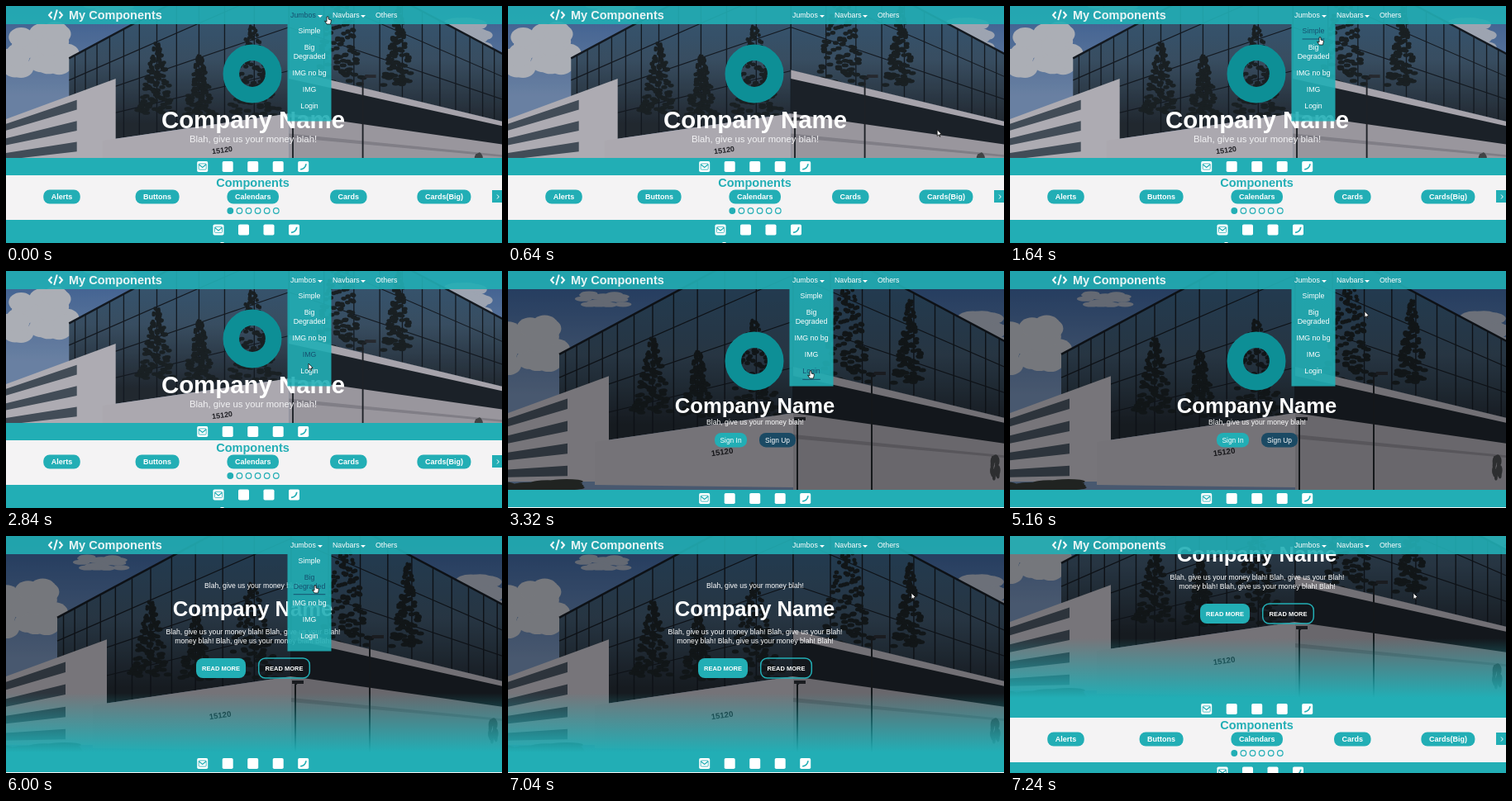
Animation, 600 px wide and 287 px high, one loop 7.28 s. Source, as an HTML page with a canvas:

```html
<!DOCTYPE html>
<html lang="en">
<head>
<meta charset="utf-8">
<title>My Components</title>
<style>
html, body { margin: 0; width: 100%; height: 100%; overflow: hidden; background: #22aeb5; }
canvas { display: block; }
</style>
</head>
<body>
<canvas id="stage" width="600" height="287"></canvas>
<script>
const c = document.getElementById('stage').getContext('2d');
const LOOP = 7280, STEP = 40, MOVE = 640;
const TEAL = '#22aeb5', GLASS = 'rgba(34,174,181,.9)', NAVY = '#15506f', WHITE = '#fff';
const SLOGAN = 'Blah, give us your money blah!';

// Pointer stops: arrival time, x, y
const STOPS = [
  [0, 389, 13], [720, 525, 156], [1640, 375, 38], [2080, 336, 125], [2440, 470, 156],
  [2840, 366, 112], [3240, 366, 121], [4080, 381, 9], [4240, 407, 14], [4680, 379, 13],
  [5560, 537, 126], [5720, 374, 60], [6640, 537, 160], [7000, 488, 69]
];

// Each item sits below the one before it
let nextY = 30;
const MENU = ['Simple', 'Big/Degraded', 'IMG no bg', 'IMG', 'Login'].map(label => {
  const lines = label.split('/'), y = nextY, last = y + (lines.length - 1) * 10.5;
  nextY = last + 20.2;
  return { lines, y, end: last + 11.5 };
});

function font(size, bold) {
  c.font = (bold ? 'bold ' : '') + size + 'px "Liberation Sans", Arial, sans-serif';
}

function text(s, x, y, size, color = WHITE, bold = false, align = 'center') {
  font(size, bold);
  c.textAlign = align;
  c.fillStyle = color;
  c.fillText(s, x, y + size * 0.36);
}

function rect(x, y, w, h, color) {
  c.fillStyle = color;
  c.fillRect(x, y, w, h);
}

function pill(x, y, w, h, r, color, line) {
  c.beginPath();
  c.roundRect(x, y, w, h, r);
  c.fillStyle = c.strokeStyle = color;
  c.lineWidth = line;
  if (line) c.stroke();
  else c.fill();
}

function trace(points) {
  c.beginPath();
  for (let i = 0; i < points.length; i += 2) c.lineTo(points[i], points[i + 1]);
}

function poly(color, ...points) {
  trace(points);
  c.fillStyle = color;
  c.fill();
}

function stroke(color, width, ...points) {
  trace(points);
  c.strokeStyle = color;
  c.lineWidth = width;
  c.stroke();
}

function blob(x, y, rx, ry, color) {
  c.beginPath();
  c.ellipse(x, y, rx, ry, 0, 0, 7);
  c.fillStyle = color;
  c.fill();
}

function fade(y0, y1, ...colors) {
  const g = c.createLinearGradient(0, y0, 0, y1);
  colors.forEach((s, i) => g.addColorStop(i / (colors.length - 1), s));
  return g;
}

function randomizer(seed) {
  return () => (seed = seed * 16807 % 2147483647) / 2147483647;
}

function cloud(x, y, w, h, color) {
  const rnd = randomizer(Math.round(x * 31 + y + 2000));
  for (let i = 0; i < 22; i++)
    blob(x + (rnd() - 0.5) * w, y + (rnd() - 0.5) * h, w * 0.2, h * 0.22, color);
}

function tree(x, top, w, h) {
  const rnd = randomizer(x * 97);
  for (let k = 0; k < 1; k += 0.008)
    blob(x + (rnd() - 0.5) * w * (0.15 + k), top + k * h, 2 + k * 3, 2.5, '#1d2428');
}

// Two-point perspective: both faces meet at the corner, lines run to the horizon
const CORNER = 345, HORIZON = 255, LEFT = -225, RIGHT = 920;
const along = (vx, x, y) => y + (HORIZON - y) * (x - CORNER) / (vx - CORNER);

function band(color, vx, x0, x1, top, bottom) {
  poly(color, x0, along(vx, x0, top), x1, along(vx, x1, top),
    x1, along(vx, x1, bottom), x0, along(vx, x0, bottom));
}

function windowFace(vx, end, bottom) {
  const roof = -51;
  band(fade(20, 185, '#3a6285', '#40586e', '#252d36'), vx, CORNER, end, roof, bottom);
  for (let y = roof; y < bottom; y += 56)
    stroke('#161c24', y === roof ? 2.5 : 1.2, CORNER, y, end, along(vx, end, y));
  for (let i = 0; i < 12; i++) {
    const x = vx + (CORNER - vx) / (1 + i * 0.085);
    stroke('#161c24', 1.4, x, along(vx, x, roof), x, along(vx, x, bottom));
  }
}

function lamp(x, y, arm) {
  stroke('#22262c', 2, x, 270, x, y + 4, x + 4, y, x + arm, y);
  rect(x + arm - 4, y - 1, 14, 4, '#2b2f35');
}

// Office building, simplified to flat areas
function building() {
  rect(-40, -10, 680, 300, fade(0, 150, '#355f9c', '#7892b8'));
  cloud(20, 92, 80, 56, '#c3c6ce');
  cloud(115, 34, 52, 14, '#a6afbf');
  cloud(555, 72, 90, 34, '#b3bbc9');

  windowFace(LEFT, 62, 172);
  windowFace(RIGHT, 640, 116);
  tree(175, 82, 44, 90);
  tree(230, 98, 36, 78);
  tree(298, 60, 62, 115);
  tree(410, 10, 62, 125);
  tree(486, 36, 34, 100);

  // Low white wing
  band('#c5c3ca', LEFT, 122, -40, 45, 255);
  for (let y = 62; y < 230; y += 52) band('#4b5663', LEFT, 72, -40, y, y + 24);

  // Ledge, dark ribbon of windows, white walls
  band('#1f262e', RIGHT, CORNER, 640, 116, 174);
  band('#bdbac2', RIGHT, CORNER, 640, 116, 127);
  band('#c2bfc7', LEFT, CORNER, 105, 172, 262);
  band('#aeabb3', RIGHT, CORNER, 640, 172, 290);
  band('#928f98', RIGHT, CORNER, 640, 198, 203);
  cloud(28, 262, 100, 14, '#363b37');
  cloud(590, 238, 10, 22, '#4b4d50');

  lamp(440, 123, 7);
  lamp(350, 178, 0);
  c.save();
  c.translate(259, 219);
  c.rotate(-0.14);
  text('15120', 0, 0, 9.6, '#24242a', true);
  c.restore();
}

function photo(height, y, scale, shade) {
  c.save();
  c.beginPath();
  c.rect(0, 0, 600, height);
  c.clip();
  c.translate(300 - 300 * scale, y);
  c.scale(scale, scale);
  building();
  c.restore();
  rect(0, 0, 600, height, `rgba(0,0,0,${shade})`);
}

function icon(kind, x, y) {
  pill(x - 6.5, y - 6.5, 13, 13, 1.8, WHITE);
  if (kind === 'mail') {
    stroke(TEAL, 1.3, x - 4.5, y - 2.7, x, y + 1, x + 4.5, y - 2.7);
    pill(x - 4.5, y - 3.6, 9, 7.2, 1, TEAL, 0.8);
  } else if (kind === 'phone') {
    c.beginPath();
    c.arc(x - 4, y - 4, 7.3, 0.1, 1.5);
    c.strokeStyle = TEAL;
    c.lineWidth = 1.8;
    c.stroke();
  }
}

function icons(kinds, x, y) {
  kinds.forEach((kind, i) => icon(kind, x + i * 30.5, y));
}

function lowerPage(y) {
  rect(0, y, 600, 21, TEAL);
  icons(['mail', '', '', '', 'phone'], 237.7, y + 10.5);
  rect(0, y + 21, 600, 54, '#f4f3f4');
  text('Components', 298.5, y + 29.3, 14.5, TEAL, true);
  ['Alerts', 'Buttons', 'Calendars', 'Cards', 'Cards(Big)'].forEach((name, i) => {
    const x = 67.5 + i * 115.6;
    font(9, true);
    const w = c.measureText(name).width + 19;
    pill(x - w / 2, y + 38.5, w, 17, 7.5, TEAL);
    text(name, x, y + 47, 9, WHITE, true);
  });
  rect(588, y + 39, 12, 15, TEAL);
  stroke(WHITE, 1, 594, y + 44.5, 596.3, y + 47, 594, y + 49.5);
  for (let i = 0; i < 6; i++) {
    const x = 271.3 + i * 11.1;
    pill(x - 3.3, y + 60.7, 6.6, 6.6, 3.3, TEAL, 1.2);
    if (i === 0) blob(x, y + 64, 3.3, 3.3, TEAL);
  }
  rect(0, y + 75, 600, 287, TEAL);
  icons(['mail', '', '', 'phone'], 257, y + 87);
  rect(259.5, y + 102, 4, 2, WHITE);
}

function ring(y) {
  c.beginPath();
  c.arc(298, y, 25.7, 0, 7);
  c.strokeStyle = '#0d8f96';
  c.lineWidth = 19.6;
  c.stroke();
}

function button(label, x, y, w, h, size, color, line) {
  pill(x - w / 2, y - h / 2, w, h, 8, color, line);
  text(label, x, y, size, WHITE, size < 8);
}

function imagePage() {
  photo(184, -31.5, 0.94, 0.12);
  ring(82);
  text('Company Name', 299, 137, 29.4, WHITE, true);
  text(SLOGAN, 299, 161, 11.27, '#f1f1f3');
  lowerPage(184);
}

function loginPage() {
  photo(265, 0, 1, 0.4);
  ring(109);
  text('Company Name', 298.5, 162.5, 25.6, WHITE, true);
  text(SLOGAN, 299, 183, 8.65);
  button('Sign In', 269.5, 204.7, 39, 17.5, 8.4, TEAL);
  button('Sign Up', 326, 204.7, 44, 17.5, 8.4, '#1b4a64');
  lowerPage(265);
}

function degradedPage(scroll) {
  c.save();
  c.translate(0, -scroll);
  photo(265, -2, 1, 0.4);
  rect(0, 190, 600, 75, fade(190, 262, 'rgba(34,174,181,0)', TEAL));
  text(SLOGAN, 299, 60, 8.65);
  text('Company Name', 298.5, 88, 25.6, WHITE, true);
  text('Blah, give us your money blah! Blah, give us your Blah!', 299, 116, 8.65);
  text('money blah! Blah, give us your money blah! Blah!', 299, 126.7, 8.65);
  button('READ MORE', 260, 160, 60, 24, 7.5, TEAL);
  button('READ MORE', 336.5, 160, 61.6, 24, 7.5, TEAL, 1.5);
  lowerPage(265);
  c.restore();
}

function caret(x) {
  poly(WHITE, x, 11, x + 6, 11, x + 3, 14);
}

function navbar(onJumbos, ruled) {
  rect(0, 0, 600, 22, GLASS);
  for (const side of [-1, 1])
    stroke('#f0f8f8', 2, 60 + side * 4.5, 7, 60 + side * 8, 11, 60 + side * 4.5, 15);
  stroke('#f0f8f8', 2, 61.8, 4.5, 58.2, 17);
  text('My Components', 76, 10.5, 14.5, '#e9f5f5', true, 'left');
  text('Jumbos', 344, 11, 8.8, onJumbos ? NAVY : WHITE, false, 'left');
  text('Navbars', 395, 11, 8.8, WHITE, false, 'left');
  text('Others', 447, 11, 8.8, WHITE, false, 'left');
  caret(377);
  caret(429);
  if (ruled) rect(349, 19.5, 34, 1, NAVY);
}

function dropdown(hot, ruled) {
  rect(340.5, 22, 53, 117.5, GLASS);
  for (const item of MENU)
    item.lines.forEach((s, i) => text(s, 367, item.y + i * 10.5, 8.8, item === hot ? NAVY : WHITE));
  if (!hot || !ruled) return;
  const w = c.measureText(hot.lines.at(-1)).width;
  rect(367 - w / 2, hot.end - 2, w, 1, NAVY);
}

function pointer(x, y, hand) {
  c.save();
  c.translate(x, y);
  trace(hand
    ? [-1, 0, 1, 0, 1, 3, 4.5, 4, 3.5, 9, -1, 9, -3.5, 5, -1, 6, -1, 0]
    : [0, 0, 0, 7.5, 1.7, 6, 3.5, 8.6, 3, 5.6, 5.3, 5.4, 0, 0]);
  c.fillStyle = WHITE;
  c.fill();
  c.strokeStyle = '#111';
  c.lineWidth = 0.8;
  c.stroke();
  c.restore();
}

function pointerAt(t) {
  const i = STOPS.findIndex(s => s[0] > t);
  if (i < 0) return STOPS.at(-1).slice(1);
  const [t0, x0, y0] = STOPS[i - 1], [t1, x1, y1] = STOPS[i];
  const k = Math.max(0, 1 - (t1 - t) / Math.min(MOVE, t1 - t0));
  const e = k * k * (3 - 2 * k);
  return [x0 + (x1 - x0) * e, y0 + (y1 - y0) * e];
}

function draw(t) {
  const [x, y] = pointerAt(t);
  const open = t < 600 || (t >= 1320 && t < 6640);
  const onJumbos = x > 343 && x < 393 && y < 21;
  const hot = open && x > 340 && x < 394 && y > 22 && MENU.find(m => y < m.end);
  const inside = hot && y < hot.end - 2;

  if (t < 3280) imagePage();
  else if (t < 6000) loginPage();
  else degradedPage(66 * Math.max(0, (t - 7080) / 160));

  navbar(onJumbos, onJumbos && x < 385);
  if (open) dropdown(hot, inside);
  pointer(x, y, onJumbos || inside);
}

function tick(now) {
  const t = now % LOOP;
  draw(t - t % STEP);
  requestAnimationFrame(tick);
}
requestAnimationFrame(tick);
</script>
</body>
</html>
```
